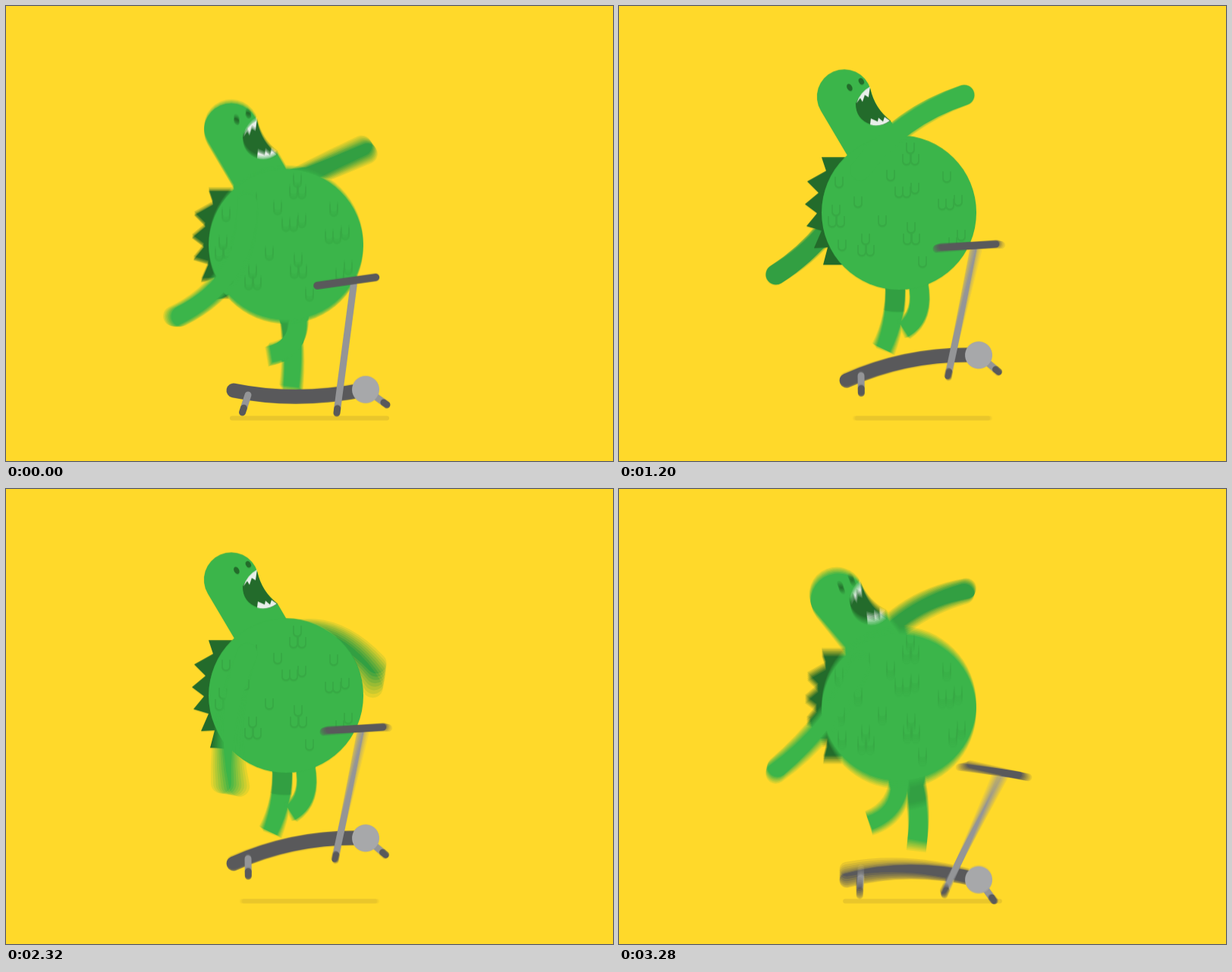
Recreate the animation shown at these times as an HTML page with a canvas. Size 800x600 px, loop 3360 ms.

```html
<!DOCTYPE html>
<html lang="en">
<head>
<meta charset="utf-8">
<title>Dinosaur on a treadmill</title>
<style>
html, body { margin: 0; width: 100%; height: 100%; overflow: hidden; background: #ffd92a; }
canvas { display: block; }
</style>
</head>
<body>
<canvas id="stage" width="800" height="600"></canvas>
<script>
const stage = document.getElementById('stage').getContext('2d');
const layer = document.createElement('canvas');
layer.width = 800;
layer.height = 600;
const c = layer.getContext('2d');

const LOOP = 3360, FRAME = 40, STEP = 280, STRIDE = 560, SWING = 840;
const SHUTTER = 20, SAMPLES = 8, TURN = 2 * Math.PI, DEG = Math.PI / 180;
const GREEN = '#3bb54a', SHADE = '#329f42', DARK = '#236b2b', TEETH = '#e9efea';
const YELLOW = '#ffd92a', IRON = '#59595b', STEEL = '#949597', WHEEL = '#a7a8aa';

const SPINES = new Path2D(`M-60 -73H-102L-96 -55L-121 -41L-106 -26L-124 -11L-108 1
  L-122 18L-102 24L-112 47L-94 46L-100 69H-70L-40 0Z`);
// Head parts are placed with the belly's centre at 369, 273
const HEAD = new Path2D('M266 138.5A36 36 0 1 1 331.5 110Q337 136 358 152L372 176V230L320 230Z');
const MOUTH = new Path2D('M331 109Q337 136 358 152Q345 161 332 157Q312 150 312 129Q318 117 331 109Z');
const FANGS = new Path2D(`M331 107Q318 114 313 129L318 122L321 127L324 118L329 121Z
  M357 152L350 147L348 153L342 148L341 153L332 149L331 157Q344 161 357 152Z`);

const U = 'v9a5 5 0 0 0 10 0v-9';
const scales = (shape, spots) => spots.map(([x, y]) => `M${x - 5} ${y - 7}${shape}`).join('');
const SCALES = new Path2D(
  scales(`${U}m-15 15${U}m1 0${U}`, [[15, -85], [16, 20], [-44, 35], [-83, -3]]) +
  scales(`${U}${U}m1 -5${U}`, [[0, -27], [57, -11]]) +
  scales(`${U}m-21 10${U}`, [[82, 30]]) +
  scales(U, [[-11, -49], [63, -47], [-22, 11], [-79, -40], [-54, -14], [-75, 43], [31, 65], [-44, -60]]));

// Eases between [time, value] points that repeat with every step
function track(t, ...points) {
  const next = Math.max(0, points.findIndex(p => p[0] > t));
  const b = points[next], a = points.at(next - 1);
  const f = (t - a[0] + STEP) % STEP / ((b[0] - a[0] + STEP) % STEP);
  return a[1] + (b[1] - a[1]) * (1 - Math.cos(Math.PI * f)) / 2;
}

function wave(t, peak, mid, size) {
  return mid + size * Math.cos((t - peak) / STRIDE * TURN);
}

function curve(p, width, color, cap = 'round') {
  c.beginPath();
  c.moveTo(p[0], p[1]);
  if (p.length > 4) c.quadraticCurveTo(p[2], p[3], p[4], p[5]);
  else c.lineTo(p[2], p[3]);
  c.lineWidth = width;
  c.strokeStyle = color;
  c.lineCap = cap;
  c.stroke();
}

function oval(x, y, rx, ry, turn, color) {
  c.beginPath();
  c.ellipse(x, y, rx, ry, turn, 0, TURN);
  c.fillStyle = color;
  c.fill();
}

function fill(path, color) {
  c.fillStyle = color;
  c.fill(path);
}

function strut(x, y, x2, y2, tip) {
  const k = 1 - tip / Math.hypot(x2 - x, y2 - y);
  const mx = x + (x2 - x) * k, my = y + (y2 - y) * k;
  curve([x, y, mx, my], 9, STEEL);
  curve([mx, my, x2, y2], 9, IRON);
}

function leg(t, color) {
  curve([wave(t, 110, 10, 16), 92, wave(t, 125, 16, 21), 138,
    wave(t, 183, -8, 32), wave(t, 275, 167.5, 22.5)], 26, color, 'butt');
}

// The hand lags behind, so the arm bends with its speed
function arm(t, color) {
  const phase = (t - 1615) / SWING * TURN;
  const side = Math.cos(phase), speed = Math.sin(phase);
  const angle = (46.5 + 82.5 * (side + 0.12 * speed * speed)) * DEG;
  const bulge = -28 - 60 * speed, reach = 173 + 4 * side;
  const x = -51, y = -56, ux = Math.cos(angle), uy = Math.sin(angle);
  curve([x, y, x + ux * reach / 2 - uy * bulge, y + uy * reach / 2 + ux * bulge,
    x + ux * reach, y + uy * reach], 27, color);
}

function head(tilt) {
  c.save();
  c.translate(-26, -90);
  c.rotate(tilt * DEG);
  c.translate(-343, -183);
  fill(HEAD, GREEN);
  fill(MOUTH, DARK);
  fill(FANGS, TEETH);
  oval(304, 108, 3.3, 5, -0.5, DARK);
  oval(319.5, 100, 3.3, 4.5, -0.5, DARK);
  c.restore();
}

function dinosaur(t, s) {
  c.save();
  c.translate(369, track(s, [83, 272], [157, 272], [265, 318]));
  arm(t + SWING / 2, SHADE);
  fill(SPINES, DARK);
  head(track(s, [0, 0], [80, 0], [160, -12]));

  // The belly casts its shadow on the far leg
  leg(t + STEP, GREEN);
  c.save();
  c.beginPath();
  c.arc(0, 29, 102, 0, TURN);
  c.clip();
  leg(t + STEP, SHADE);
  c.restore();
  leg(t, GREEN);

  oval(0, 0, 102, 102, 0, GREEN);
  c.strokeStyle = 'rgba(35,107,43,.17)';
  c.lineWidth = 1.8;
  c.lineCap = 'butt';
  c.stroke(SCALES);
  arm(t, GREEN);
  c.restore();
}

function treadmill(s) {
  const x = 300, wheelX = 474, midX = 382;
  const y = track(s, [0, 507], [80, 494], [145, 445], [212, 517]);
  const wheelY = track(s, [0, 506], [80, 460], [208, 516]);
  const midY = (y + wheelY) / 2 + track(s, [0, 18], [80, -20], [210, -22]);
  const slope = (midY - y) / (midX - x);
  curve([x, y, midX, midY, wheelX, wheelY], 19, IRON);
  strut(x + 19, y + 19 * slope + 2, x + 14 - 12 * slope, y + 19 * slope + 25, 6);

  c.save();
  c.translate(wheelX, wheelY);
  c.rotate(track(s, [0, 0], [72, 3.5], [145, 28.5]) * DEG);
  strut(10, 7, 28, 20, 5);
  oval(0, 0, 18, 18, 0, WHEEL);
  strut(-16, -138, -38, 31, 6);
  curve([-64, -137, 13, -148], 10, IRON);
  c.restore();
}

function scene(t) {
  const s = t % STEP, half = track(s, [0, 102], [120, 82], [205, 102]);
  c.fillStyle = YELLOW;
  c.fillRect(0, 0, 800, 600);
  curve([400 - half, 543.5, 400 + half, 543.5], 6, '#e9c62b');
  dinosaur(t, s);
  treadmill(s);
}

let shown = -1;
function tick(now) {
  const frame = Math.min(Math.floor(now % LOOP / FRAME), LOOP / FRAME - 2);
  if (frame !== shown) {
    shown = frame;
    // Average several moments for motion blur
    for (let i = 0; i < SAMPLES; i++) {
      scene(LOOP + frame * FRAME + SHUTTER * ((i + 0.5) / SAMPLES - 0.5));
      stage.globalAlpha = 1 / (i + 1);
      stage.drawImage(layer, 0, 0);
    }
  }
  requestAnimationFrame(tick);
}
tick(performance.now());
</script>
</body>
</html>
```
